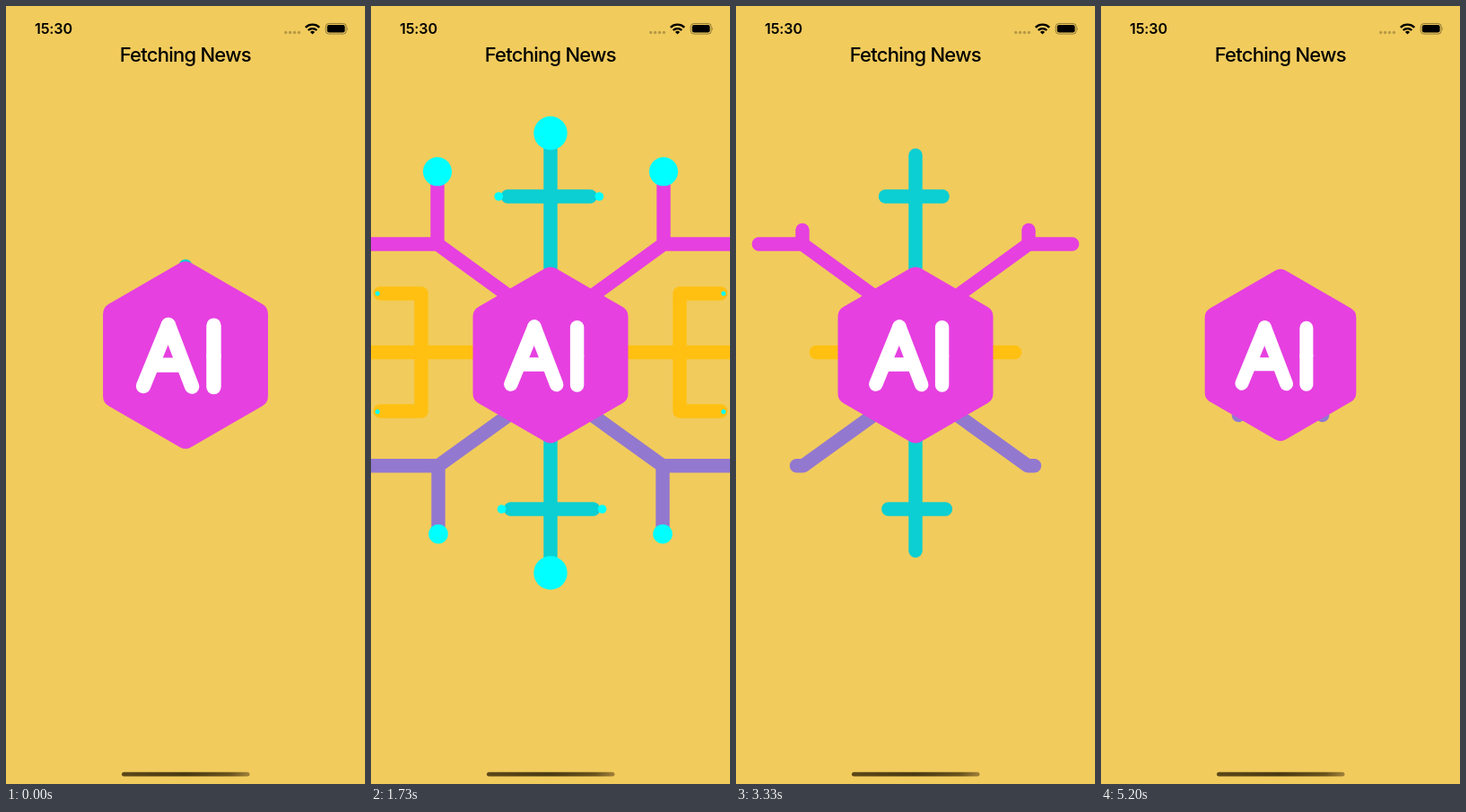
These frames come from a looping animation (400x866 px, 5.27 s). An HTML page:

```html
<!DOCTYPE html>
<html lang="en">
<head>
<meta charset="utf-8">
<title>Fetching News</title>
<style>
  html, body { margin: 0; width: 100%; height: 100%; overflow: hidden; background: #f1cb5c; }
  svg { display: block; width: 400px; height: 866px; }
  text { font-family: Inter, "Liberation Sans", sans-serif; fill: #000; }
  .line { fill: none; stroke-width: 15.4; stroke-linecap: round; stroke-linejoin: round; }
</style>
</head>
<body>
<svg viewBox="0 0 400 866" xmlns="http://www.w3.org/2000/svg">
  <defs>
    <linearGradient id="bar">
      <stop offset="0" stop-color="#5c4818"/>
      <stop offset=".5" stop-color="#4a3a14"/>
      <stop offset=".85" stop-color="#6a541e"/>
      <stop offset="1" stop-color="#a2823a"/>
    </linearGradient>
  </defs>
  <rect width="400" height="866" fill="#f1cb5c"/>
  <g id="lines"></g>
  <g id="dots"></g>
  <circle id="disc" cx="200" cy="388.5" fill="#e640e0"/>
  <g id="badge">
    <path id="hex" fill="#e640e0" stroke="#e640e0" stroke-width="24" stroke-linejoin="round"/>
    <g id="letters" transform="translate(-200 -388.5)"></g>
  </g>

  <text x="32" y="31" font-size="16" font-weight="600" letter-spacing="-.1">15:30</text>
  <text x="199.7" y="62" font-size="22" font-weight="500" letter-spacing="-.75" text-anchor="middle">Fetching News</text>
  <g fill="#000" opacity=".24">
    <circle cx="311.7" cy="29.5" r="1.7"/><circle cx="316.6" cy="29.5" r="1.7"/>
    <circle cx="321.5" cy="29.5" r="1.7"/><circle cx="326.4" cy="29.5" r="1.7"/>
  </g>
  <g fill="none" stroke="#000" stroke-width="2.4">
    <path d="M333.8 23.8a11 11 0 0 1 15.4 0"/>
    <path d="M336.7 27a7 7 0 0 1 9.6 0"/>
  </g>
  <path d="M341.5 31.6l-2.6-2.7a3.8 3.8 0 0 1 5.2 0z"/>
  <rect x="356.2" y="19.5" width="23" height="11.6" rx="3.6" fill="none" stroke="#000" stroke-opacity=".4"/>
  <rect x="357.8" y="21.1" width="19.8" height="8.4" rx="2.2"/>
  <path d="M380.3 23.4q1.4 1.9 0 3.8z" opacity=".45"/>
  <rect x="129" y="852.8" width="142.5" height="4.8" rx="2.4" fill="url(#bar)"/>
</svg>
<script>
  const LOOP = 5270, STEP = LOOP / 79, CYCLE = 3065, REST = 2560;
  const TEAL = '#0bcfd2', CYAN = '#00ffff', PINK = '#e640e0', PURPLE = '#9378d0', ORANGE = '#ffc012';
  const MIRROR = 'matrix(-1 0 0 1 400 0)';
  const $ = id => document.getElementById(id);
  const clamp = x => Math.min(1, Math.max(0, x));
  const smooth = x => (x = clamp(x), x * x * (3 - 2 * x));
  const ramp = (t, start, length) => smooth((t - start) / length);

  const make = (parent, tag, attrs) => {
    const el = document.createElementNS('http://www.w3.org/2000/svg', tag);
    for (const k in attrs) el.setAttribute(k, attrs[k]);
    return parent.appendChild(el);
  };

  // time = [draw start, draw length, erase start, erase length]
  const trims = [], dots = [];
  const trim = (parent, d, stroke, time, transform = '') =>
    trims.push({ time, el: make(parent, 'path', { d, stroke, transform, class: 'line', pathLength: 1 }) });
  const line = (d, color, time) => trim($('lines'), d, color, time);
  const pair = (d, color, time) => {
    line(d, color, time);
    trim($('lines'), d, color, time, MIRROR);
  };
  const dot = (cx, cy, start, end) =>
    dots.push({ start, end, el: make($('dots'), 'circle', { cx, cy, fill: CYAN }) });
  const dotPair = (x, y, start, end) => {
    dot(x, y, start, end);
    dot(400 - x, y, start, end);
  };

  const bracket = [500, 340, 1720, 170], stem = [-315, 730, 1850, 350], cross = [145, 230, 1640, 350];
  pair('M150 385.5H-60', ORANGE, [100, 480, 1720, 360]);
  pair('M56 385.5V320H8', ORANGE, bracket);
  pair('M56 385.5V451H8', ORANGE, bracket);
  pair('M156 324.5L74 265H-60', PINK, [-8, 470, 1700, 420]);
  pair('M74 265V184', PINK, [155, 410, 1760, 190]);
  pair('M156 453.5L75 511.7H-60', PURPLE, [49, 470, 1720, 450]);
  pair('M75 511.7V588', PURPLE, [270, 380, 1760, 190]);
  line('M200 388V141', TEAL, stem);
  line('M200 388V631', TEAL, stem);
  for (const [mid, y] of [[198.3, 212], [201.6, 560]])
    for (const dx of [-56, 56]) {
      line(`M${mid} ${y}h${dx}`, TEAL, cross);
      dot(mid + dx, y, 450, 1470);
    }
  dot(200, 141.5, 557, 1590);
  dot(200, 631, 557, 1590);
  dotPair(74, 184.3, 672, 1554);
  dotPair(75, 587.7, 723, 1513);
  dotPair(7.2, 320, 810, 1450);
  dotPair(7.2, 451.5, 810, 1450);

  const letter = (d, time) => trim($('letters'), d, '#fff', time);
  const stroke = [-260, 200, 2200, 270];
  letter('M182 357L155.8 421', [-330, 150, 2330, 140]);
  letter('M182 357L206.7 421.5', [-230, 170, 2150, 215]);
  letter('M166 399H197', [-200, 140, 2150, 215]);
  letter('M229.6 389.6V357.6', stroke);
  letter('M229.6 389.6V422', stroke);

  $('hex').setAttribute('d', 'M' + [...Array(6).keys()].map(i =>
    [86 * Math.sin(i * Math.PI / 3), -86 * Math.cos(i * Math.PI / 3)].map(v => v.toFixed(2))).join('L') + 'Z');

  const dotScale = (t, start, end) => t < end
    ? 1.22 * ramp(t, start, 258) - .22 * ramp(t, start + 258, 212)
    : (1 + .22 * ramp(t, end, 132)) * (1 - ramp(t, end + 132, 198));
  const shrink = (t, start, length) => 1 - clamp((t - start) / length) ** 3;

  function draw(now) {
    const time = Math.floor(((now % LOOP) + 5) / STEP) * STEP % LOOP;
    const phase = time % CYCLE;
    const t = phase > REST ? phase - CYCLE : phase;

    for (const { el, time: [a, b, c, d] } of trims) {
      const p = ramp(t, a, b) - ramp(t, c, d);
      el.style.display = p > .002 ? '' : 'none';
      el.setAttribute('stroke-dasharray', p > .999 ? 'none' : `${p} 2`);
    }
    for (const { el, start, end } of dots)
      el.setAttribute('r', 15.5 * Math.max(0, dotScale(t, start, end)));

    const size = (1.12 * ramp(t, -480, 335) - .12 * ramp(t, -145, 300)) * shrink(t, 1975, 560);
    $('badge').setAttribute('transform', `translate(200 388.5) scale(${size})`);
    $('disc').setAttribute('r', 80 * ramp(t, -505, 250) * shrink(t, 2060, 500));
  }

  const begin = performance.now();
  const tick = () => {
    draw(performance.now() - begin);
    requestAnimationFrame(tick);
  };
  tick();
</script>
</body>
</html>
```
